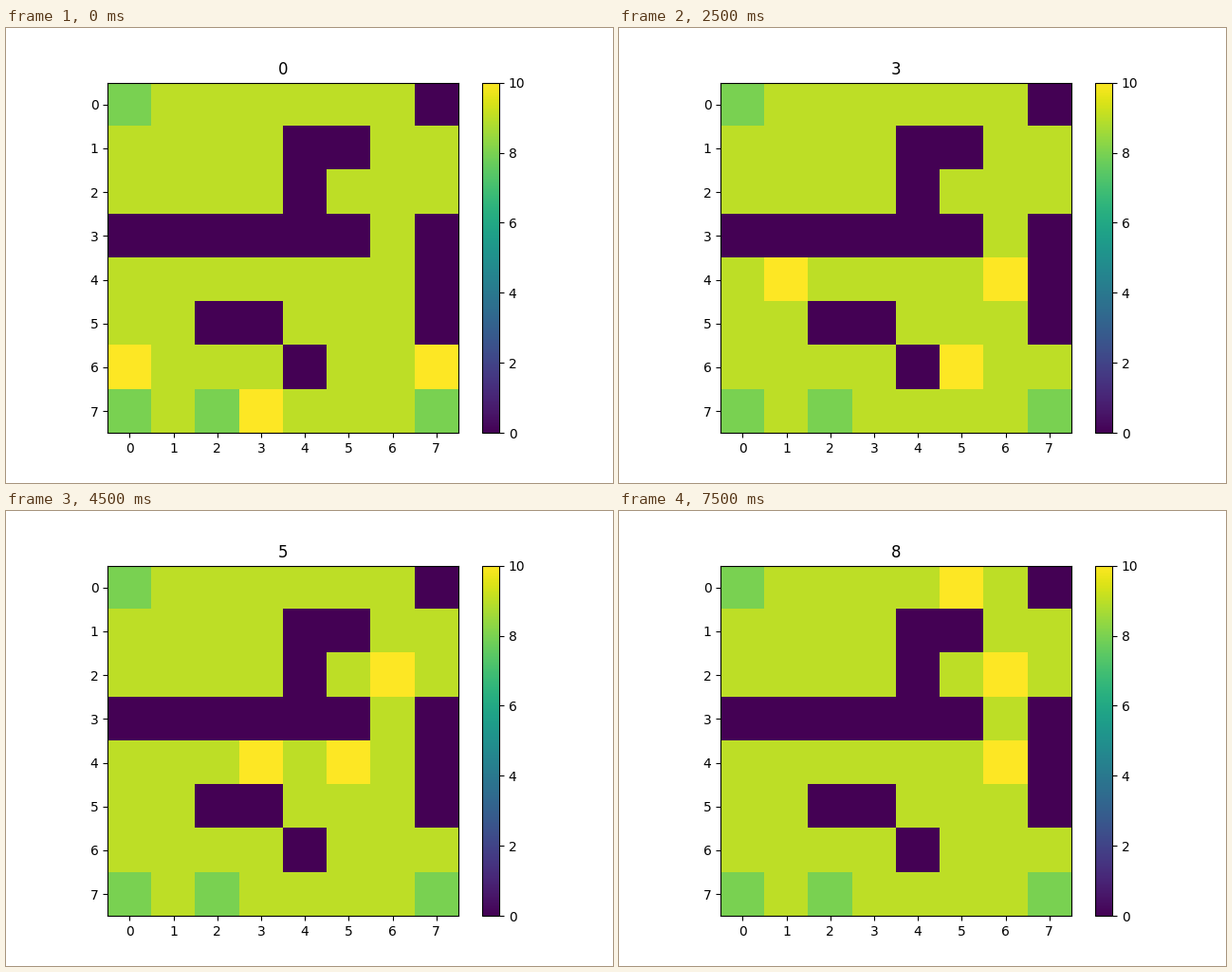
A matplotlib script that plays this animation: 640x480 px, repeating every 8000 ms.

```python
import matplotlib.pyplot as plt
import numpy as np
from matplotlib.animation import FuncAnimation

WALL, GOAL, FREE, AGENT = 0, 8, 9, 10
SIZE = 8
INTERVAL = 500
FRAMES = 16

# Corners (row, column) of each agent's route, walked at one cell per step
ROUTES = [
    [(6, 0), (4, 0), (4, 6)],
    [(7, 3), (7, 5), (4, 5), (4, 6), (2, 6)],
    [(6, 7), (6, 6), (0, 6), (0, 5)],
]


def make_base():
    grid = np.full((SIZE, SIZE), FREE)
    # Walls: two long bars, a hook above them and a few short blocks
    grid[3, :6] = WALL
    grid[3:6, -1] = WALL
    grid[1:3, 4] = grid[1, 4:6] = WALL
    grid[5, 2:4] = grid[6, 4] = grid[0, -1] = WALL
    # Goals: the open corners and one cell on the bottom edge
    grid[0, 0] = grid[-1, 0] = grid[-1, 2] = grid[-1, -1] = GOAL
    return grid


def position(route, step):
    corners = np.array(route)
    legs = np.abs(np.diff(corners, axis=0)).sum(axis=1)
    reached = np.concatenate([[0], np.cumsum(legs)])
    return tuple(int(round(np.interp(step, reached, axis)))
                 for axis in corners.T)


def grid_at(step):
    grid = BASE.copy()
    for route in ROUTES:
        grid[position(route, step)] = AGENT
    return grid


def update(frame):
    # The first step is held for half as long as the others
    step = (frame + 1) // 2
    image.set_data(grid_at(step))
    title.set_text(str(step))
    return image, title


BASE = make_base()

fig, ax = plt.subplots(figsize=(6.4, 4.8), dpi=100)
image = ax.imshow(grid_at(0), cmap="viridis", vmin=0, vmax=10)
fig.colorbar(image, ax=ax)
title = ax.set_title("0")

anim = FuncAnimation(fig, update, frames=FRAMES, interval=INTERVAL,
                     repeat=True, repeat_delay=0, blit=False)
plt.show()
```
